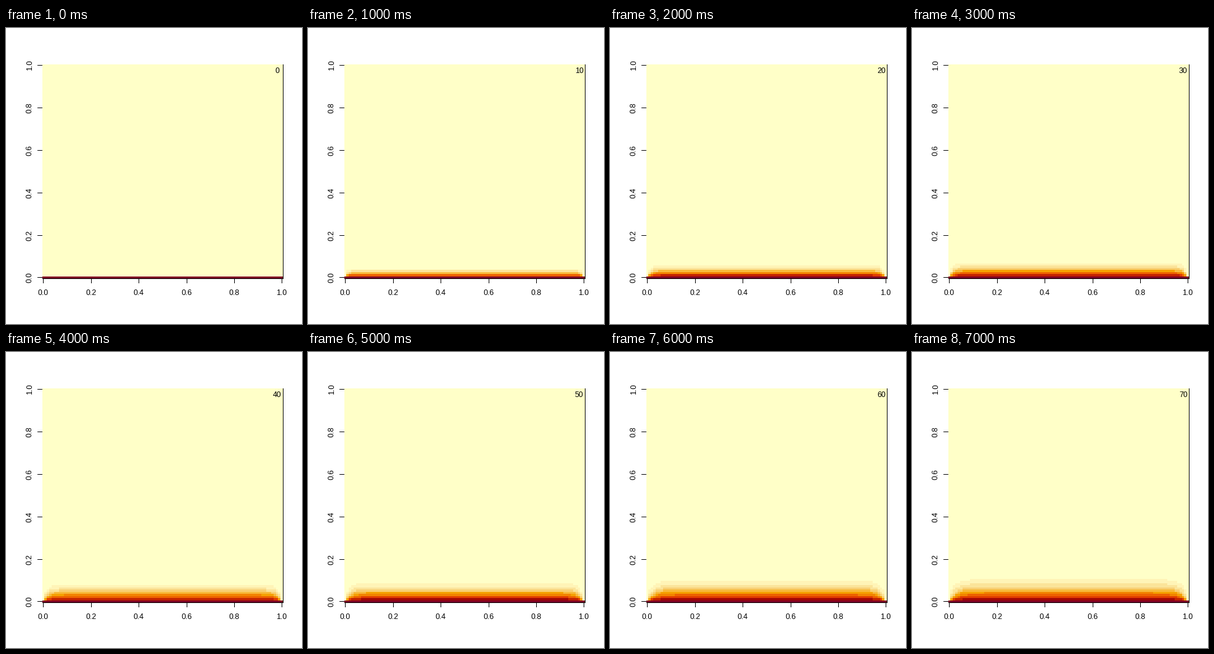
A matplotlib script that plays this animation: 480 px wide and 480 px high, repeating every 8 s.

```python
import numpy as np
import matplotlib.pyplot as plt
from matplotlib.animation import FuncAnimation
from matplotlib.patches import Rectangle

SIZE = 480
DPI = 72
CELLS = 100
COLOURS = 12
FRAMES = 8
STEPS_PER_FRAME = 10

# Plot region in pixels
LEFT, RIGHT, TOP, BOTTOM = 59.04, 449.76, 59.04, 406.56
CELL_W = (RIGHT - LEFT) / CELLS
CELL_H = (BOTTOM - TOP) / CELLS


def hcl_to_rgb(h, c, l):
    """Polar CIELUV to sRGB, clipped to the displayable range."""
    y = ((l + 16) / 116) ** 3
    u = c * np.cos(np.radians(h)) / (13 * l) + 0.1978398
    v = c * np.sin(np.radians(h)) / (13 * l) + 0.4683363
    x = 9 * y * u / (4 * v)
    z = -x / 3 - 5 * y + 3 * y / v
    matrix = np.array([[3.240479, -1.537150, -0.498535],
                       [-0.969256, 1.875992, 0.041556],
                       [0.055648, -0.204043, 1.057311]])
    lin = np.clip(matrix @ np.array([x, y, z]), 0, 1)
    rgb = np.where(lin > 0.00304, 1.055 * lin ** (1 / 2.4) - 0.055, 12.92 * lin)
    return np.round(255 * np.clip(rgb, 0, 1)).astype(np.uint8)


def heat_palette(n):
    """Pale yellow through orange to dark red."""
    i = np.linspace(0, 1, n)
    c_start, c_end, c_max = 40, 75, 180
    peak = 1 / (1 + (c_max - c_end) / (c_max - c_start))
    chroma = np.interp(i ** 1.6, [0, peak, 1], [c_start, c_max, c_end])
    return hcl_to_rgb(85 - 80 * i, chroma, 99 - 74 * i ** 1.3).T


def diffuse(steps):
    """Average the four neighbours; the hot bottom and cold sides stay fixed."""
    u = np.zeros((CELLS, CELLS))
    u[0] = 1
    for _ in range(steps):
        u[1:-1, 1:-1] = (u[:-2, 1:-1] + u[2:, 1:-1]
                         + u[1:-1, :-2] + u[1:-1, 2:]) / 4
    return u


# Whole-pixel cell edges
x_edges = np.floor(LEFT + CELL_W * np.arange(CELLS + 1)).astype(int)
y_edges = np.floor(TOP + CELL_H * np.arange(CELLS + 1) + 1e-6).astype(int)
col_of = np.repeat(np.arange(CELLS), np.diff(x_edges))
row_of = np.repeat(np.arange(CELLS)[::-1], np.diff(y_edges))
palette = heat_palette(COLOURS)


def heat_image(steps):
    level = np.minimum((diffuse(steps) * COLOURS).astype(int), COLOURS - 1)
    return palette[level[np.ix_(row_of, col_of)]]


fig = plt.figure(figsize=(SIZE / DPI, SIZE / DPI), dpi=DPI, facecolor="white")
ax = fig.add_axes([0, 0, 1, 1])
x0, x1, y0, y1 = x_edges[0], x_edges[-1], y_edges[0], y_edges[-1]
image = ax.imshow(heat_image(0), extent=(x0, x1, y1, y0),
                  interpolation="nearest", aspect="auto")
ax.set_xlim(0, SIZE)
ax.set_ylim(SIZE, 0)
ax.axis("off")


def bar(x, y, w, h):
    ax.add_patch(Rectangle((x, y), w, h, fc="black", lw=0, antialiased=False))


def label(x, y, text, **kw):
    return ax.text(x, y, text, family="Liberation Sans", size=12.4,
                   ha="center", va="baseline", color="black", **kw)


bar(x1, y0, 1, y1 - y0 + 1)
bar(x0, y1, x1 - x0 + 1, 1)
for value in np.arange(6) / 5:
    tx = int(LEFT + CELL_W * (0.5 + value * (CELLS - 1)))
    ty = int(BOTTOM - CELL_H * (0.5 + value * (CELLS - 1)))
    bar(tx, y1, 1, 8)
    bar(x0 - 8, ty, 8, 1)
    label(tx, 433, f"{value:.1f}")
    ax.text(42, ty + 0.5, f"{value:.1f}", family="Liberation Sans", size=12.4,
            rotation=90, rotation_mode="anchor", ha="center", va="baseline")

counter = label(439.8, 73, "0")


def update(frame):
    steps = frame * STEPS_PER_FRAME
    image.set_data(heat_image(steps))
    counter.set_text(str(steps))
    return image, counter


anim = FuncAnimation(fig, update, frames=FRAMES, interval=1000, repeat=True,
                     repeat_delay=0, blit=False)
plt.show()
```
